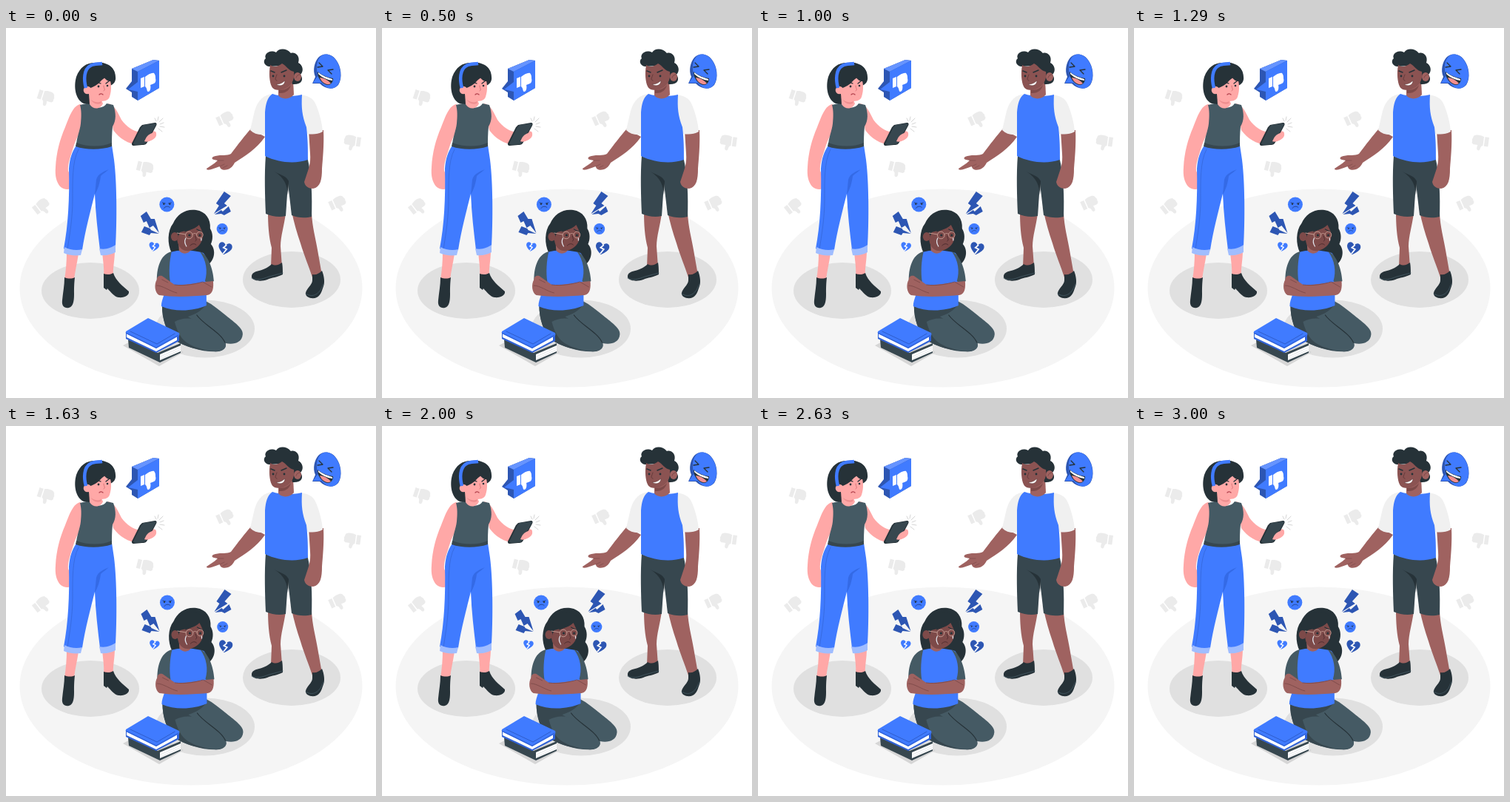
An HTML page for the animation above (3.04 s loop, 500 px wide and 500 px high).

```html
<!DOCTYPE html>
<html lang="en">
<head>
<meta charset="utf-8">
<title>Bullying scene</title>
<style>
  html, body { margin: 0; width: 100%; height: 100%; overflow: hidden; background: #fff; }
  svg { display: block; width: 100%; height: 100%; }
  .blue { fill: #407bff; }
  .deep { fill: #2d56b3; }
  .ink { fill: #263238; }
  .dark { fill: #37474f; }
  .slate { fill: #455a64; }
  .pink { fill: #ffa8a7; }
  .brown { fill: #9f6260; }
  .face { fill: #7d4a49; }
  .line { fill: none; stroke-linecap: round; stroke-linejoin: round; stroke: #263238; stroke-width: 1; }
</style>
</head>
<body>
<svg viewBox="0 0 500 500">
  <defs>
    <g id="thumb">
      <path d="M-11-8h5.500v12.500h-5.500z"/>
      <path d="M-4-8C0-10 7-10 9-8C11-7 10-5 11-4C12-2 11-1 11 0C12 2 10 4 8 4L3 4C4 7 4 11 2 11C0 12-1 10-1 8C-1 6-3 4-4 4Z"/>
    </g>
    <path id="heart" d="M0 7C-5 3-8 0-8-3C-8-8-2-9 0-4C2-9 8-8 8-3C8 0 5 3 0 7Z"/>
    <path id="crack" d="M1-5L-2-1L2 0L-1 6" fill="none" stroke="#fff" stroke-width="1.600"/>
    <g id="sad">
      <circle r="10" class="blue"/>
      <path class="line" style="stroke:#24468f" d="M-6-2.500l4 1M6-2.500l-4 1M-4 5C-2 2 2 2 4 4"/>
      <circle cx="-4" cy="-.6" r="1.100" class="ink"/><circle cx="4" cy="-.6" r="1.100" class="ink"/>
    </g>
  </defs>

  <ellipse cx="250" cy="351.500" rx="231.500" ry="134" fill="#f5f5f5"/>
  <g fill="#e0e0e0">
    <ellipse cx="114" cy="355" rx="66" ry="38"/>
    <ellipse cx="386" cy="340" rx="66" ry="38"/>
    <ellipse cx="269" cy="406.500" rx="67" ry="39"/>
  </g>
  <g id="thumbs" fill="#ebebeb"></g>

  <!-- woman with phone -->
  <g>
    <path class="pink" d="M82 303L98 305C96 318 93 330 92 340H79C81 328 82 315 82 303Z"/>
    <path class="pink" d="M130 302L147 300C147 315 144 325 145 336H132C133 325 131 315 130 302Z"/>
    <path class="ink" d="M79 337C84 339 89 339 93 337C92 346 92 352 92 358C92 366 92 376 85 378C79 379 75 376 76 368C77 357 79 348 79 337Z"/>
    <path class="ink" d="M132 332C137 334 142 333 145 331C148 341 158 349 166 356C167 361 160 365 152 364C146 363 142 357 137 352L136 354L132 351Z"/>
    <path class="pink" d="M101 103C91 104 86 119 80 134C73 150 68 168 67 188C66 200 68 208 73 214C78 219 87 219 90 215C91 209 88 201 84 193C83 183 88 172 92 158C96 146 103 137 106 125Z"/>
    <path class="pink" d="M138 102C147 104 151 114 156 124C163 134 172 139 181 141L180 158C165 157 153 149 145 138Z"/>
    <path class="blue" d="M95 159C89 167 86 177 85 190C86 230 84 267 78 298C84 303 95 304 103 300C107 274 114 248 120 224C121 250 124 275 127 300C135 303 143 300 148 296C150 260 150 210 146 178L143 158Z"/>
    <path fill="#346ae6" d="M139 191C132 194 124 197 122 205L120 225C124 219 127 209 128 200C132 196 136 194 139 191Z"/>
    <path class="line" style="stroke:#3567d8;stroke-width:.8" d="M98 164C89 180 90 210 90 232C90 257 86 280 83 299"/>
    <path fill="#a0bdff" d="M79 296C86 300 96 301 103 299L101 307C93 308 84 307 78 304Z"/>
    <path fill="#a0bdff" d="M126 298C134 300 142 297 148 293L148 303C143 306 135 308 128 307Z"/>
    <path class="slate" d="M100 104L113 101C117 109 131 110 136 102L145 104C149 115 149 125 144 133C143 143 143 151 143 159C128 164 108 164 95 159C95 149 100 139 101 129C102 119 102 111 100 104Z"/>
    <path class="dark" d="M95 155C110 161 130 161 143 155V160C128 165 108 165 94 160Z"/>
    <path class="ink" d="M105 102C94 97 91 80 95 66C100 52 110 46 122 47C136 45 148 53 148 66C149 72 145 77 140 78L126 84L114 103Z"/>
    <path class="pink" d="M112 88L113 103C118 111 128 110 131 102L128 96Z"/>
    <path fill="#ee8f90" d="M115 97C120 101 125 101 129 99L128 102C122 104 117 101 115 97Z"/>
    <path class="pink" d="M110 83C111 77 122 79 138 63C143 73 143 84 140 93C138 99 130 100 122 98C116 97 112 92 110 83Z"/>
    <path class="ink" d="M108 82C116 82 127 76 132 66C137 74 145 73 147 69C149 59 143 51 134 49L112 57Z"/>
    <circle class="pink" cx="110" cy="84" r="5.300"/>
    <path d="M108 81C105 70 105 56 114 51C119 48 124 49 130 48" fill="none" stroke="#407bff" stroke-width="4.500"/>
    <path class="line" style="stroke-width:1.300" d="M121 73C124 73 126 74 128 75M135 75L140 71"/>
    <circle class="ink" cx="125" cy="79" r="1.400"/><circle class="ink" cx="137" cy="78" r="1.300"/>
    <path class="line" style="stroke:#d87477" d="M132 78C132 82 135 83 132 85"/>
    <path class="line" style="stroke:#b54550;stroke-width:1.300" d="M126 90C128 88 130 89 131 90"/>
    <path class="pink" d="M180 141C188 135 195 138 202 140C205 144 201 150 195 152C189 155 183 155 179 157Z"/>
    <path class="ink" d="M184 131L201 128C204 128 204 130 203 132L190 156C188 158 186 158 184 158L173 159C170 159 169 157 171 154L181 134Z"/>
    <path class="dark" d="M186 131L201 129C203 129 203 130 202 132L189 155C188 157 186 157 184 157L175 158C172 158 172 156 173 154L183 134Z"/>
    <path class="pink" d="M189 149C191 144 198 141 202 141C205 144 202 150 196 152C192 154 188 154 187 153Z"/>
    <path class="line" style="stroke:#c9c9c9;stroke-width:.8" d="M203 126L201 122M205 125L206 120M207 127L212 122M208 130L213 128M208 133L214 134M206 136L211 140"/>
  </g>
  <g>
    <path class="deep" d="M170 55L199 43L207 44V81L178 98L170 93V87L162 82L170 72Z"/>
    <path fill="#6694ff" d="M170 55L199 43L207 44L178 59Z"/>
    <path class="blue" d="M178 59L207 44V81L178 98V86L165 83L178 73Z"/>
    <path fill="#fff" d="M182 68L187 66V79L182 81ZM188 66C192 63 197 60 200 61C202 63 202 66 202 68C203 71 202 74 200 75L195 77C196 81 195 86 192 86C190 86 191 81 188 79Z"/>
  </g>

  <!-- pointing young man -->
  <g>
    <path class="brown" d="M354 248L378 250C376 267 371 281 371 295L373 323H358L359 297C355 282 354 265 354 248Z"/>
    <path class="brown" d="M386 248L413 250C414 270 418 282 421 300L427 334L414 337C409 321 403 308 398 291C393 277 389 262 386 248Z"/>
    <path class="ink" d="M359 319C364 322 369 320 373 317C374 322 374 329 374 333C367 337 359 337 353 340C345 343 334 342 332 337C331 331 337 329 342 328C350 326 355 323 359 319Z"/>
    <path class="ink" d="M414 333C419 334 423 332 427 328C430 335 431 344 429 349C427 354 426 361 420 364C414 367 404 364 405 358C406 352 414 347 414 341Z"/>
    <path class="line" style="stroke:#455a64;stroke-width:.8" d="M332 338C338 342 347 339 355 336L374 331M405 359C411 363 419 363 425 354L429 346"/>
    <path class="dark" d="M351 172C349 198 350 228 351 251C360 255 370 256 378 254L381 210L386 253C395 257 405 257 413 255C414 227 413 198 407 174Z"/>
    <path class="ink" d="M363 194C371 199 378 199 382 207L381 226C380 213 377 203 363 194Z"/>
    <path class="brown" d="M331 136C323 145 313 158 304 170C298 173 291 171 283 173C278 174 277 177 281 178L286 179C281 184 275 187 271 190C271 193 276 192 289 187C289 191 294 193 300 191C305 189 307 186 309 182C323 173 339 163 350 147Z"/>
    <path class="line" style="stroke:#7d4a49;stroke-width:.7" d="M286 179L294 179M289 187L295 184M293 189L299 186"/>
    <path fill="#f0f0f0" d="M362 89C349 89 340 98 336 112L330 138C335 143 342 145 349 144L357 118Z"/>
    <path class="brown" d="M409 138L429 138C430 158 428 177 427 190C427 205 425 215 415 217C409 217 404 214 403 208L406 199C409 190 412 183 411 170Z"/>
    <path fill="#f0f0f0" d="M395 90C408 91 415 94 419 104C424 116 427 128 428 140C421 144 414 144 407 143L396 118Z"/>
    <path class="blue" d="M360 89C372 93 388 93 400 90C399 108 400 118 406 134C408 151 408 165 408 178C391 184 368 182 350 173V114C351 102 353 94 360 89Z"/>
    <path class="brown" d="M368 75L368 91C372 97 384 97 389 90L388 70Z"/>
    <path class="face" d="M369 83C375 85 381 82 385 77C384 83 378 89 369 88Z"/>
    <path class="ink" d="M387 76C399 77 403 70 398 63C403 58 401 50 395 47C398 38 391 32 385 34C379 27 369 27 365 33C356 28 348 36 351 41C346 45 350 52 356 52L372 51L384 63Z"/>
    <path fill="#8b5352" d="M357 50C355 61 356 73 359 79C363 87 377 84 383 78C388 73 390 67 389 59C382 58 379 51 373 48C367 53 361 53 357 50Z"/>
    <ellipse class="brown" cx="394" cy="66" rx="5" ry="6"/>
    <path class="line" style="stroke:#704141;stroke-width:.8" d="M392 67C393 64 395 63 397 63"/>
    <path class="line" style="stroke-width:1.400" d="M358 58L363 60M372 60L379 57"/>
    <circle class="ink" cx="361" cy="65" r="1.400"/><circle class="ink" cx="376" cy="65" r="1.400"/>
    <path class="line" style="stroke:#643b3b" d="M366 63C365 67 362 70 366 71"/>
    <path fill="#fff" stroke="#643b3b" stroke-width=".6" d="M365 76C370 76 374 74 377 71C377 77 371 80 365 76Z"/>
  </g>
  <g>
    <path class="deep" d="M422 40C427 34 439 33 446 43C453 52 455 68 449 77C443 84 432 83 424 75L414 75L418 66C414 57 417 46 422 40Z"/>
    <ellipse class="blue" cx="436" cy="58.500" rx="15.500" ry="23.500" transform="rotate(-15 436 58.500)"/>
    <path class="blue" d="M421 65L415 74L427 74Z"/>
    <path class="line" style="stroke-width:1.300" d="M423 47L428 52L421 53M442 56L435 57L440 62"/>
    <path class="ink" d="M421 59C427 64 435 67 442 68C442 74 438 79 431 76C425 73 421 66 421 59Z"/>
    <path fill="#f28f8f" d="M424 67C429 67 436 71 439 75C435 78 427 75 424 67Z"/>
    <path fill="#fff" d="M422 60C428 65 435 67 441 69L441 71C434 70 427 67 422 62Z"/>
  </g>

  <!-- crying girl, shaking -->
  <g id="girl">
    <path class="slate" d="M211 374C211 393 217 411 227 421C243 432 270 439 288 437C296 435 298 431 297 426C307 428 319 426 320 414C321 406 309 398 298 389C288 381 280 374 270 369Z"/>
    <path class="dark" d="M211 375C230 382 254 379 270 369L271 373C265 382 256 387 246 390C264 402 285 411 296 425C298 433 292 438 280 437C260 436 238 429 227 421C217 410 211 394 211 375Z"/>
    <path class="slate" d="M228 397C240 390 255 391 267 400C280 409 298 419 297 430C293 440 274 437 262 433C247 428 235 424 228 397Z"/>
    <path class="line" style="stroke-width:1.200" d="M258 388C267 401 290 411 296 425"/>
    <path class="ink" d="M224 304C218 292 218 274 226 264C231 252 243 244 257 246C270 248 277 258 276 271C280 277 280 286 277 292C285 301 281 315 273 320L254 318Z"/>
    <path class="blue" d="M222 303C235 299 255 300 267 304C276 315 273 336 271 349L271 375C253 383 228 384 210 376C210 366 217 356 218 344Z"/>
    <path class="slate" d="M224 302C211 305 204 320 204 341C209 345 217 345 222 343C220 330 221 314 224 302Z"/>
    <path class="slate" d="M262 302C273 306 280 325 281 342C277 345 273 345 269 342C273 329 271 314 262 302Z"/>
    <path class="brown" d="M204 340C200 346 201 358 207 361C226 364 250 363 272 361C280 360 281 350 280 342L270 343C255 345 240 348 228 347L211 335C206 334 204 337 204 340Z"/>
    <path class="line" style="stroke:#7d4a49;stroke-width:.9" d="M204 348C212 348 222 356 231 358M211 340L219 344M228 347C242 349 256 346 266 343L278 350"/>
    <path class="brown" d="M233 288L234 301C239 306 246 306 250 300L248 292Z"/>
    <path class="face" d="M232 269C230 283 231 294 238 299C247 305 260 298 264 289C268 281 267 271 260 262C251 260 240 261 232 269Z"/>
    <path class="ink" d="M225 285C224 267 232 254 247 251C264 250 273 263 273 278L276 292C269 290 268 279 261 266C255 273 242 274 235 276L230 290Z"/>
    <ellipse class="face" cx="228" cy="282" rx="5" ry="6"/>
    <path class="line" style="stroke-width:1.200" d="M242 275L249 272M258 272L264 275"/>
    <g fill="none" stroke="#c49a91" stroke-width="1">
      <circle cx="247.500" cy="280" r="4.800"/><circle cx="262" cy="279.500" r="4.300"/>
      <path d="M252 279C254 277 256 277 258 279M243 279L231 277"/>
    </g>
    <circle class="ink" cx="248" cy="280" r="1.600"/><circle class="ink" cx="262" cy="280" r="1.500"/>
    <path class="line" style="stroke:#e3e7ef;stroke-width:1.200" d="M243 284C241 288 242 292 244 295M264 284V287"/>
    <path class="line" style="stroke:#4e2d30" d="M256 281C256 285 259 286 256 288M249 294C252 291 255 291 257 293"/>

    <use href="#sad" transform="translate(217.500 238.500)"/>
    <use href="#sad" transform="translate(292.300 271.500) scale(.75)"/>
    <path class="deep" d="M182 254L190 248L196 258L201 258L207 277L199 267L194 270L190 261L186 263ZM187 268L195 271L196 273L207 278L196 277L194 280L183 276Z"/>
    <path class="deep" d="M295 221L304 227L295 237L299 240L281 251L288 240L284 237ZM282 252L291 246L293 248L301 241L304 248L295 253L291 251Z"/>
    <g transform="translate(200 296) rotate(10) scale(.85)"><use href="#heart" class="blue"/><use href="#crack"/></g>
    <g transform="translate(296 298.500) rotate(12) scale(1.150)"><use href="#heart" class="deep"/><use href="#crack"/></g>
  </g>

  <!-- books -->
  <g>
    <path fill="#d6d6d6" d="M158 429L194 410L240 438L207 457Z"/>
    <path class="dark" d="M165 421L205 439L236 426V439L208 452L166 432Z"/>
    <path fill="#fff" d="M208 441L236 429V437L208 449Z"/>
    <path class="line" style="stroke:#cfd4d8;stroke-width:.6" d="M209 444L235 432M209 447L235 435"/>
    <path fill="#2f61d6" d="M162 412L193 393L234 413V423L203 439L162 420Z"/>
    <path fill="#fff" d="M163 413L203 433L231 417V422L203 437L163 418Z"/>
    <path class="blue" d="M162 410L192 392L234 412C235 415 234 416 232 417L203 433L162 413Z"/>
    <path class="line" style="stroke:#2d5ac4;stroke-width:.9" d="M162 412L203 432L233 415M168 410L204 427L228 413"/>
  </g>
</svg>
<script>
  const LOOP = 3040, FPS = 24, LAST = 72;
  // x offset of the shake at every 300 ms
  const shake = [0, -1, 2, -4, 4, -4, 4, -4, 2, -1, 0];

  // x, y, rotation, mirror
  const places = [
    [53.500, 94, 18, 1], [296.500, 124, -24, 1], [468, 154.500, 8, -1],
    [187.500, 190, 14, 1], [48.500, 242, -38, 1], [448.500, 238, -24, 1]
  ];
  document.getElementById('thumbs').innerHTML = places.map(([x, y, r, m]) =>
    `<use href="#thumb" transform="translate(${x} ${y}) rotate(${r}) scale(${m} 1)"/>`).join('');

  const girl = document.getElementById('girl');
  const start = performance.now();

  function offset(ms) {
    const pos = (ms % 3000) / 300, i = Math.floor(pos);
    return shake[i] + (shake[i + 1] - shake[i]) * (pos - i);
  }

  function draw(now) {
    const t = Math.max(0, now - start) % LOOP;
    const step = Math.min(LAST, Math.floor((t + 4) * FPS / 1000));
    const x = offset((step + 1) * 1000 / FPS);
    girl.setAttribute('transform', `translate(${x.toFixed(3)} 0)`);
    requestAnimationFrame(draw);
  }
  draw(start);
</script>
</body>
</html>
```
